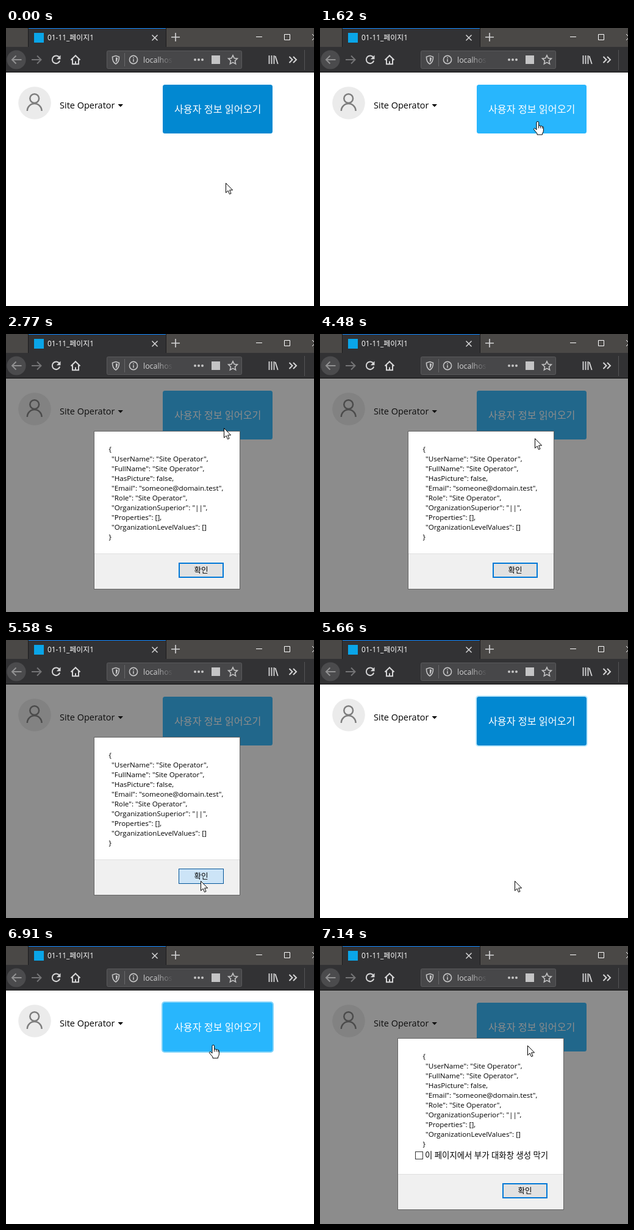
An HTML page for the animation above (8 s loop, 505 by 456 pixels).

```html
<!DOCTYPE html>
<html lang="ko">
<head>
<meta charset="utf-8">
<title>User info dialog</title>
<style>
html, body { margin: 0; width: 100%; height: 100%; overflow: hidden; background: #fff; }
svg { display: block; width: 100%; height: 100%; }
text { font-family: "Open Sans", "Noto Sans CJK KR", "Noto Sans CJK", sans-serif; }
.icon { fill: none; stroke: #d6d6d7; stroke-width: 2; }
.soft { stroke: #c4c4c5; stroke-width: 1.6; }
.thin { fill: none; stroke: #fff; stroke-width: 1; }
.json { font-size: 11.65px; }
.mid { text-anchor: middle; }

.btn, .ring, .cursor, .arrow, .hand, .dim, .first, .second, .hot { animation: 8s step-end infinite; }
.btn { animation-name: btn; }
.ring { animation-name: ring; }
.cursor { animation-name: move; }
.arrow { animation-name: arrow; }
.hand { animation-name: hand; }
.dim { animation-name: dim; }
.first { animation-name: first; }
.second { animation-name: second; }
.hot { animation-name: hot; }

@keyframes btn {
  0% { fill: #0288d1; }
  19.375% { fill: #169fe7; }
  20.25% { fill: #28b6fd; }
  70.75%, 77.375% { fill: #0288d1; }
  78.5% { fill: #169fe7; }
  79.5%, 100% { fill: #28b6fd; }
}
@keyframes ring {
  0% { opacity: 0; }
  31.875% { opacity: 1; }
  32.75% { opacity: 0; }
  70.75% { opacity: .5; }
  71.75% { opacity: 1; }
  87.375%, 100% { opacity: 0; }
}
@keyframes move {
  0% { transform: translate(360px, 254px); }
  17.375% { transform: translate(359px, 235px); }
  18.375% { transform: translate(358px, 190px); }
  19.375% { transform: translate(357px, 160px); }
  20.25% { transform: translate(357px, 154px); }
  56% { transform: translate(352px, 171px); animation-timing-function: steps(2, end); }
  58% { transform: translate(338px, 235px); animation-timing-function: steps(2, end); }
  60% { transform: translate(323px, 340px); animation-timing-function: steps(2, end); }
  62% { transform: translate(319px, 406px); animation-timing-function: steps(2, end); }
  64% { transform: translate(319px, 395px); }
  71.75% { transform: translate(320px, 388px); animation-timing-function: steps(3, end); }
  74.75% { transform: translate(332px, 255px); animation-timing-function: steps(3, end); }
  77.375% { transform: translate(340px, 171px); }
  78.5% { transform: translate(340px, 165px); }
  79.5%, 100% { transform: translate(340px, 163px); }
}
@keyframes arrow {
  0% { opacity: 1; }
  19.375% { opacity: 0; }
  34.625% { opacity: 1; }
  77.375% { opacity: 0; }
  89.25%, 100% { opacity: 1; }
}
@keyframes hand {
  0% { opacity: 0; }
  19.375% { opacity: 1; }
  34.625% { opacity: 0; }
  77.375% { opacity: 1; }
  89.25%, 100% { opacity: 0; }
}
@keyframes dim {
  0% { opacity: 0; }
  32.75% { opacity: 1; }
  70.75% { opacity: 0; }
  87.375%, 100% { opacity: 1; }
}
@keyframes first {
  0% { opacity: 0; }
  33.75% { opacity: 1; }
  70.75%, 100% { opacity: 0; }
}
@keyframes second {
  0% { opacity: 0; }
  88.25%, 100% { opacity: 1; }
}
@keyframes hot {
  0% { opacity: 0; fill: #e5f1fb; stroke: #0078d7; }
  63% { opacity: 1; fill: #e5f1fb; stroke: #0078d7; }
  68.75% { opacity: 1; fill: #d8eaf9; stroke: #0066b8; }
  69.75%, 100% { opacity: 1; fill: #cce4f7; stroke: #005499; }
}
</style>
</head>
<body>
<svg viewBox="0 0 505 456" xmlns="http://www.w3.org/2000/svg">
  <defs>
    <linearGradient id="fade" gradientUnits="userSpaceOnUse" x1="246" x2="274" y1="0" y2="0">
      <stop stop-color="#d2d2d3"/>
      <stop offset="1" stop-color="#d2d2d3" stop-opacity="0"/>
    </linearGradient>
    <g id="json" class="json">
      <text x="168.5" y="193">{</text>
      <text x="173" y="209">"UserName": "Site Operator",</text>
      <text x="173" y="225">"FullName": "Site Operator",</text>
      <text x="173" y="241">"HasPicture": false,</text>
      <text x="173" y="257">"Email": "someone@domain.test",</text>
      <text x="173" y="273">"Role": "Site Operator",</text>
      <text x="173" y="289">"OrganizationSuperior": "||",</text>
      <text x="173" y="305">"Properties": [],</text>
      <text x="173" y="321">"OrganizationLevelValues": []</text>
      <text x="168.5" y="337">}</text>
    </g>
    <rect id="ok" x="284" y="376" width="72" height="23" fill="#e1e1e1" stroke="#0078d7" stroke-width="2"/>
    <text id="okText" class="mid" x="320" y="391.5" font-size="12.5">확인</text>
  </defs>

  <!-- page -->
  <rect width="505" height="456" fill="#fff"/>
  <circle cx="47" cy="123" r="26.8" fill="#ebebeb"/>
  <g fill="none" stroke="#7d7d7d" stroke-width="2.5">
    <circle cx="46.7" cy="115.6" r="7.4"/>
    <path d="M34.8 136a11.9 11.9 0 0 1 23.8 0"/>
  </g>
  <text x="88" y="132" font-size="14.5">Site Operator</text>
  <path d="M183.5 125h8.5l-4.25 4.5z"/>
  <rect class="ring" x="255" y="91" width="184" height="84" rx="5" fill="#84d4f9"/>
  <rect class="btn" x="257" y="93" width="180" height="80" rx="3.5"/>
  <text class="mid" x="347.2" y="138.5" font-size="16.2" fill="#fff">사용자 정보 읽어오기</text>
  <rect class="dim" y="73" width="505" height="383" fill="#1a1a1a" fill-opacity=".5"/>

  <!-- tab strip -->
  <rect width="505" height="31" fill="#4a4846"/>
  <rect y="31" width="505" height="41" fill="#323234"/>
  <rect y="72" width="505" height="1" fill="#0c0c0d"/>
  <rect x="36" width="227" height="31" fill="#1c1c1d"/>
  <rect x="37" width="225" height="32" fill="#323234"/>
  <rect x="37" width="225" height="1" fill="#0a84ff"/>
  <rect x="46" y="8" width="16" height="16" fill="#0aa5e8"/>
  <text x="68" y="20.3" font-size="11.9" fill="#fff">01-11_페이지1</text>
  <path class="icon" style="stroke-width:1.5" d="M239.5 11.5l9 9m0-9l-9 9"/>
  <path class="icon" style="stroke-width:1.6" d="M271 15h14M278 8v14"/>
  <path class="thin" d="M410 14.5h10M456.5 10.5h9v9h-9zM502 10l10 10m0-10l-10 10"/>

  <!-- toolbar -->
  <circle cx="17" cy="52" r="15.6" fill="#4b4b4d"/>
  <path class="icon" style="stroke:#919192" d="M25.5 52H10m6.5-6.5L10 52l6.5 6.5"/>
  <path class="icon" style="stroke:#747476" d="M42 52h15.5m-6.5-6.5l6.5 6.5-6.5 6.5"/>
  <path class="icon" d="M87.6 48.6a6.3 6.3 0 1 0 .6 5"/>
  <path d="M89.5 44.5v6.7h-6.7z" fill="#d6d6d7"/>
  <path class="icon" d="M106.5 52.5l7.5-7.3 7.5 7.3M109 51v8.2h10V51M114 59.5v-5"/>
  <rect x="165.5" y="37.5" width="221" height="29" rx="2" fill="#474749" stroke="#5a5a5c"/>
  <g class="icon soft">
    <path d="M180 45.5l5.5 1.8q.3 8.5-5.5 11.7-5.8-3.2-5.5-11.7z"/>
    <circle cx="209" cy="52" r="6.6"/>
    <path d="M209 51v4.5M209 48v1.7"/>
    <path d="M372 44.8l2.2 4.8 5.2.6-3.9 3.5 1.1 5.2-4.6-2.6-4.6 2.6 1.1-5.2-3.9-3.5 5.2-.6z"/>
  </g>
  <path d="M180 48v8.3q3-2.3 3-7.3z" fill="#c4c4c5"/>
  <path d="M194.5 41v22" stroke="#69696b"/>
  <text x="225" y="57" font-size="12.4" fill="url(#fade)">localhos</text>
  <g fill="#c4c4c5">
    <circle cx="310" cy="52" r="2"/>
    <circle cx="316" cy="52" r="2"/>
    <circle cx="322" cy="52" r="2"/>
    <rect x="337" y="45" width="14" height="14"/>
  </g>
  <path class="icon" style="stroke-width:1.8" d="M431.5 45v14M435.5 45v14M439.5 45v14M441.5 46l4.2 13"/>
  <path class="icon" d="M464.5 47l5 5-5 5m6.5-10l5 5-5 5"/>
  <path d="M489.5 36v33" stroke="#545456"/>

  <!-- first dialog -->
  <g class="first">
    <rect x="144.5" y="159.5" width="239" height="259" fill="#fff" stroke="#646464"/>
    <rect x="145" y="360" width="238" height="58" fill="#f0f0f0"/>
    <rect x="145" y="360" width="238" height="1" fill="#dfdfdf"/>
    <use href="#json"/>
    <use href="#ok"/>
    <rect class="hot" x="283.5" y="375.5" width="73" height="24"/>
    <use href="#okText"/>
  </g>

  <!-- second dialog -->
  <g class="second">
    <rect x="127.5" y="151.5" width="272" height="281" fill="#fff" stroke="#646464"/>
    <rect x="128" y="374" width="271" height="58" fill="#f0f0f0"/>
    <rect x="128" y="374" width="271" height="1" fill="#dfdfdf"/>
    <use href="#json" y="-8"/>
    <rect x="156.5" y="337.5" width="12" height="12" fill="#fff" stroke="#333"/>
    <text x="172" y="348" font-size="13.4">이 페이지에서 부가 대화창 생성 막기</text>
    <use href="#ok" x="16" y="14"/>
    <use href="#okText" x="16" y="14"/>
  </g>

  <g class="cursor" fill="#fff" stroke="#000" stroke-linejoin="round">
    <path class="arrow" d="M.5.5v15.7l3.6-3.4 2.4 5.7 2.5-1.1-2.4-5.5h5z"/>
    <g class="hand">
      <path d="M-2 12V1.2a1.8 1.8 0 0 1 3.6 0v5.3q1.8-1 3.2.4 1.8-.7 3 .8 1.6-.1 1.6 1.8V14q0 3-1.8 5v2H-1v-2L-6 13q-1.2-2 .4-2.6 1.4-.2 3.6 2.6z"/>
      <path fill="none" d="M1.6 6.5v4M4.8 7v3.5M7.8 8v3"/>
    </g>
  </g>
</svg>
</body>
</html>
```
